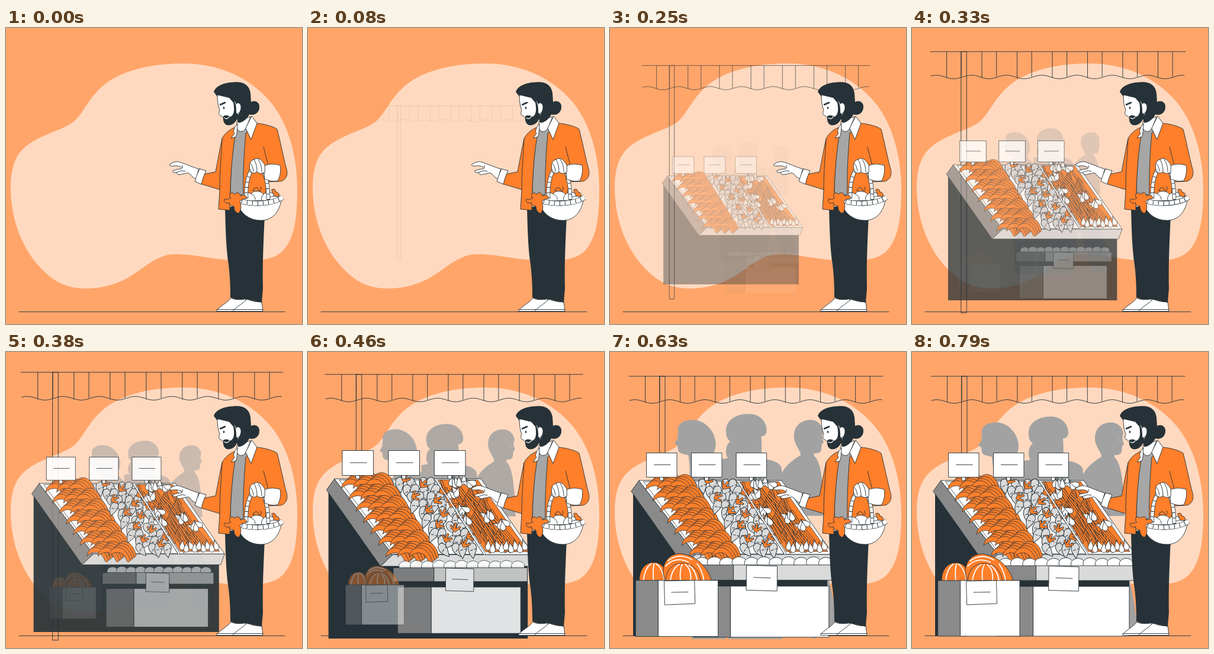
An HTML page for the animation above (830 ms loop, 500 by 500 pixels).

```html
<!DOCTYPE html>
<html lang="en">
<head>
<meta charset="utf-8">
<title>Market stall</title>
<style>
html, body { margin: 0; width: 100%; height: 100%; overflow: hidden; background: #ffa56a; }
svg { display: block; width: 100%; height: 100%; stroke-linecap: round; stroke-linejoin: round; }
.ln { fill: none; stroke: #263238; }
.wh { fill: #fff; stroke: #263238; }
.or { fill: #ff7f2a; stroke: #263238; }
.dk { fill: #263238; }
.gr { fill: #a6a6a6; }
.md { fill: #8a8a8a; stroke: #263238; }
.lt { fill: #dadada; stroke: #263238; }
.hl { fill: none; stroke: #fff; stroke-width: 1.8; }
#produce { stroke-width: .75; }
#people { fill: #a2a2a2; }
</style>
</head>
<body>
<svg viewBox="0 0 500 500" stroke-width=".9">
  <path fill="#ffd9bf" d="M8 270C8 218 26 200 60 184C88 171 104 168 118 155C136 136 145 105 184 84C218 66 258 60 300 60C360 60 412 84 446 124C478 162 492 218 492 272C492 322 487 356 467 377C450 393 425 393 395 393C350 392 322 382 286 382C252 382 232 409 200 425C180 435 158 440 135 440C98 440 75 425 52 398C24 365 8 318 8 270Z"/>
  <path class="ln" d="M22 479.4H471"/>

  <g id="awning"></g>

  <g id="people">
    <path d="M118 137C116 124 130 118 144 119C162 120 178 136 180 156C181 166 176 176 172 182L190 200L196 480H140L137 196L135 177C126 175 119 174 118 169L117 161L112 158L117 150Z"/>
    <path d="M197 138C196 120 213 109 234 109C253 109 264 122 264 136C264 143 260 146 255 146C256 158 256 168 255 183C272 184 283 188 288 196L304 320L290 480H200L190 300L188 184L200 182C195 174 196 161 204 154C199 151 197 146 197 138Z"/>
    <path d="M309 146C309 129 320 119 336 119C347 119 355 126 357 137L355 146L358 156L355 159L354 168C353 174 347 174 342 174L342 178C352 186 355 210 357 236L359 277H326L366 380C374 410 378 440 380 462L340 480L296 330L287 212C292 196 308 184 320 177C321 170 309 160 309 146Z"/>
    <path d="M350 145a4 4 0 1 0 6 0" fill="none" stroke="#d6c3b7" stroke-width=".6"/>
  </g>

  <g id="stall">
    <path class="dk" d="M39 238L128 352H367V480H39Z"/>
    <path class="md" d="M36 235L49 217L145 342L125 361Z"/>
    <path class="wh" d="M49 217H290L377 342H145Z"/>
    <path class="lt" d="M145 342H377L370 361H125Z"/>
    <g id="produce"></g>
    <g id="signs"></g>
  </g>

  <g id="shelf">
    <g id="eggs"></g>
    <path class="md" d="M136 361H210V386H136ZM144 396H205V480H144Z"/>
    <path class="lt" d="M210 361H379V386H210Z"/>
    <path class="wh" d="M205 396H367V480H205Z"/>
    <path class="wh" d="M231.500 361.500L282 363L281.500 404L231 402.500Z"/>
    <path class="ln" d="M243 381.500L271 382.500"/>
  </g>

  <g id="crate">
    <path class="or" d="M50 386C50 368 60 356 74 356C88 356 97 368 97 386Z"/>
    <path class="hl" d="M57 386Q59 366 70 358M74 386Q72 370 75 358M92 386Q88 364 78 358"/>
    <path class="or" d="M90 372C90 352 103 341 118 341C142 343 163 360 171 386H93Z"/>
    <path class="hl" d="M98 353Q116 339 138 351M94 362Q110 345 132 355M147 358Q156 370 158 386"/>
    <path class="or" d="M94 386C95 368 106 357 122 357C140 357 150 370 153 386Z"/>
    <path class="hl" d="M102 386Q105 366 117 359M119 386Q117 370 122 359M136 386Q138 368 127 359M147 386Q144 368 133 360"/>
    <path class="md" d="M44 386H82V480H44Z"/>
    <path class="wh" d="M82 386H182V480H82Z"/>
    <path class="wh" d="M92 387L142.500 386L143.500 425L93 427Z"/>
    <path class="ln" d="M104 406L132 405.500"/>
  </g>

  <g id="man">
    <path class="wh" d="M356 477C361 470 373 465 380 456C388 460 396 459 405 457L402 478.500H356Z"/>
    <path class="wh" d="M384 477C390 470 400 466 407 458C415 461 425 464 432 462L434 478.500H384Z"/>
    <path class="ln" d="M356 475.500H384M384 475.500H434"/>
    <path class="dk" d="M370 304C371 345 372 375 376 400C379 425 379 445 379 455Q392 461 405 458L432 464L434 440C433 400 435 360 437 316L400 298Z"/>
    <path class="gr" d="M388 172C382 200 379 250 379 284L404 281L408 170Z" stroke="#263238"/>
    <path class="or" d="M386 168C376 172 368 180 365 187C361 205 357 228 354 243L334 247L328 263L361 273L359 306L378 308C379 260 381 215 388 178Z"/>
    <path class="ln" d="M365 187C364 210 361 240 361 273"/>
    <path class="or" d="M405 178L424 161C436 162 452 166 458 171C463 190 468 215 473 235C477 245 475 256 464 259L440 260L437 304H404L401 283C400 250 402 210 405 178Z"/>
    <path class="ln" d="M435 201L443 232"/>
    <path class="wh" d="M325 238C315 235 304 230 295 227C288 224 281 227 276 231C278 235 284 232 290 233C296 234 299 236 296 238C290 238 285 240 282 241C281 244 284 245 288 244C289 247 292 249 296 247C302 247 306 243 310 246C314 251 318 254 321 255Z"/>
    <path class="ln" d="M288 244L297 241L303 242M297 237Q300 234 298 232"/>
    <path class="wh" d="M327 238L338 241Q332 253 330 264L319 259Q322 248 327 238Z"/>

    <path class="wh" d="M390 158L390 169C394 178 402 176 406 168L413 150Z"/>
    <path class="wh" d="M391 162C385 168 383 175 386 178L380 186L388 184C391 178 390 172 391 162Z"/>
    <path class="wh" d="M405 169L415 149L424 161L414 188Z"/>
    <path class="dk" d="M351 108C354 98 368 92 385 91.500C402 90 411 97 413 110L414 125C421 121 429 126 428 134C428 143 419 149 411 146C408 153 399 161 392 160L380 120L357 116Z"/>
    <path class="wh" d="M357 113C357 123 358 131 361 139C359 143 359 147 363 148L370 154L390 152L395 142L387 124L379 115Z"/>
    <path class="dk" d="M357 108L378 112C385 117 387 126 389 136L392 147C391 158 382 166 373 164C368 162 366 156 367 149C372 146 376 148 379 150C386 147 386 137 384 126L377 118L356 113Z"/>
    <path class="wh" d="M388 129C391 124 397 127 397 134C397 141 392 147 389 144Z"/>
    <path d="M369 152Q374 155 377 150" fill="none" stroke="#fff" stroke-width="1.400"/>
    <path d="M362 129.500L370 126" stroke="#263238" stroke-width="2.600"/>
    <ellipse class="dk" cx="368" cy="135" rx="1.300" ry="2"/>

    <g id="basket">
      <path class="wh" d="M395 290C397 279 407 276 414 280C420 272 432 276 435 281C442 274 453 278 461 286L458 293H400Z"/>
      <path class="or" d="M417 274Q422 265 428 274Q424 278 417 274ZM449 273Q455 270 456 277Q463 278 461 285L453 284Z"/>
      <path class="ln" d="M428 277Q433 272 430 268M414 280Q422 284 421 290M435 281Q430 286 432 291M442 290Q445 284 453 284"/>
    </g>
    <path class="wh" d="M391 293C394 312 410 325 431 325C451 325 462 309 465 291Z"/>
    <g id="ropes"></g>
    <path class="wh" d="M436 233C446 228 456 230 463 232C465 241 463 250 459 258C451 260 444 258 437 255Z"/>
    <path class="wh" d="M437 231C431 221 425 218 419 222C412 224 410 231 412 239C414 245 419 247 424 243C429 247 434 246 437 243Z"/>
    <path class="ln" d="M419 222Q424 230 424 243M426 222Q432 230 432 243M413 229Q417 233 418 242"/>
    <path class="or" d="M379 287C374 281 382 275 386 281C389 276 396 278 396 284C401 280 408 283 406 288C401 289 397 290 395 293C398 300 397 309 393 313C387 312 385 306 385 301C380 301 376 298 378 295C371 298 367 293 369 289C373 289 376 291 379 287Z"/>
  </g>
</svg>

<script>
const $ = id => document.getElementById(id);
const range = (n, f) => Array.from({ length: n }, (_, i) => f(i)).join('');
const path = (cls, d, at = '') => `<path class="${cls}" d="${d}" ${at && `transform="${at}"`}/>`;
const place = (x, y, r = 0, s = 1) => `translate(${x.toFixed(1)} ${y.toFixed(1)}) rotate(${r.toFixed(0)}) scale(${s})`;

let seed = 11;
const rnd = (a, b) => {
  seed = (seed * 16807) % 2147483647;
  return a + (b - a) * seed / 2147483647;
};

// Awning: pleats alternate wide and narrow, the hem waves with them
const pleats = range(7, i => `M${59.5 + i * 59.2} 41V85` + `M${84 + i * 59.2} 41V83`);
let hem = 'M33 82';
for (let x = 36; x <= 461; x += 3) hem += `L${x} ${(83.6 + 3 * Math.cos((x - 71.5) * 2 * Math.PI / 59.2)).toFixed(1)}`;
$('awning').innerHTML = path('ln', 'M32 41H461' + pleats) + path('ln', hem) + path('ln', 'M84 41H93V480H84Z');

// Produce: u runs across a bin, v from back to front
const spot = (x, w, u, v) => [x + w * u + 80 * v, 217 + 124 * v];
const banana = 'M-17 8C-18-10 6-20 21 9C22 14 17 15 15 11C8-3-6-5-17 8Z';
const bunch = (x, y) => range(4, k => path('or', banana, place(x + 6 - k * 4, y - 4 + k * 3.4, 14 - k * 2)));
const root = (x, y, r) => path('lt', 'M-4-4C0-8 6-5 5 0C4 5-2 7-9 11C-9 5-8-1-4-4ZM-5 1L-2 2M0 3L2 4', place(x, y, r, 1.3));
const tuft = (x, y, r) => path('or', 'M0 0L-6-7L-4-9L0-4L1-13L4-13L4-4L10-9L12-7L4 2Z', place(x, y, r));
const bulb = (x, y, r) => path('wh', 'M0-8C0-3 5 0 4 5C2 9-3 8-4 4C-4 0-1-3 0-8Z', place(x, y, r, 1.15));

const bananas = range(7, i => range(3, j => bunch(...spot(82, 64, j / 3.3, .03 + i * .152))));
const roots = range(10, i => range(4, j => root(...spot(152, 62, (j + rnd(.1, .7)) / 4, .04 + i * .097), rnd(-80, 0))));
const tufts = range(14, i => tuft(...spot(158, 56, i % 3 / 2.4 + rnd(0, .15), .02 + i / 15), rnd(0, 70)));
const stalks = range(56, i => {
  const [x, y] = spot(222, 64, (i * .382) % .82, .02 + i / 76);
  return path('or', 'M0 0L2-1.500L27 27L25 29Z', place(x, y, rnd(-6, 28)));
});
const heaps = [[248, 222], [268, 222], [245, 239], [258, 268], [263, 282], [301, 278], [324, 291]];
const bulbs = heaps.map(([x, y]) => range(4, k => bulb(x - 6 + k * 4, y + rnd(-4, 4), rnd(-70, 20)))).join('');
const front = range(9, i => bulb(302 + i * 7.4, 326 + i % 2 * 4, rnd(-25, 15)));

$('produce').innerHTML =
  path('wh', 'M57 219H140L216 341H148ZM144 219H214L294 341H219Z') +
  path('or', 'M220 219H285L368 337H298Z') +
  bananas + roots + tufts + stalks + bulbs + front +
  path('hl', 'M216 219L296 341') + path('ln', 'M215 219L294 341M218.500 219L298 341');

$('signs').innerHTML = [62, 138, 213.5].map(x =>
  path('wh', `M${x + 22} 211V217H${x + 28}V211`) +
  path('wh', `M${x} 170.500H${x + 51}V211.500H${x}Z`) +
  path('ln', `M${x + 12.5} 190.500H${x + 40}`)).join('');

$('eggs').innerHTML = range(11, i => `<ellipse class="wh" cx="${158 + i * 20.4}" cy="${358 - i % 2}" rx="12" ry="9.500"/>`);

const rope = (d, w) =>
  `<g fill="none" stroke-linecap="butt"><path d="${d}" stroke="#263238" stroke-width="${w + 1.6}"/>
  <path d="${d}" stroke="#fff" stroke-width="${w}"/>
  <path d="${d}" stroke="#263238" stroke-width="${w}" stroke-dasharray="1 8"/></g>`;
$('ropes').innerHTML = rope('M406 288C405 265 409 248 416 238', 5) +
  rope('M443 290C443 268 440 250 433 238', 5) +
  rope('M390 289C405 299 448 299 467 286', 7);

// Entrances: [id, centre x, centre y, start in ms]
const LOOP = 830, SPAN = 490;
const parts = [
  ['awning', 247, 261, -9],
  ['stall', 208, 325, 86],
  ['people', 238, 288, 182],
  ['shelf', 255, 412, 182],
  ['crate', 113, 412, 287]
].map(([id, x, y, start]) => ({ el: $(id), x, y, start }));

const cubic = (a, b, t) => 3 * (1 - t) * (1 - t) * t * a + 3 * (1 - t) * t * t * b + t * t * t;

function ease(x) {
  if (x <= 0) return 0;
  if (x >= 1) return 1;
  let lo = 0, hi = 1;
  for (let i = 0; i < 24; i++) {
    const mid = (lo + hi) / 2;
    if (cubic(.36, .5, mid) < x) lo = mid; else hi = mid;
  }
  return cubic(-.01, 1.38, lo);
}

function draw(ms) {
  // the opening runs slightly ahead of the clock
  const t = ms + Math.min(ms, 19, Math.max(0, (250 - ms) / 4));
  for (const { el, x, y, start } of parts) {
    const p = ease((t - start) / SPAN), s = .5 + p / 2;
    el.setAttribute('opacity', Math.max(0, Math.min(1, p)));
    el.setAttribute('transform', `translate(${x * (1 - s)} ${y * (1 - s)}) scale(${s})`);
  }
}

let origin;
function tick(now) {
  origin ??= now;
  draw((now - origin) % LOOP);
  requestAnimationFrame(tick);
}
draw(0);
requestAnimationFrame(tick);
</script>
</body>
</html>
```
